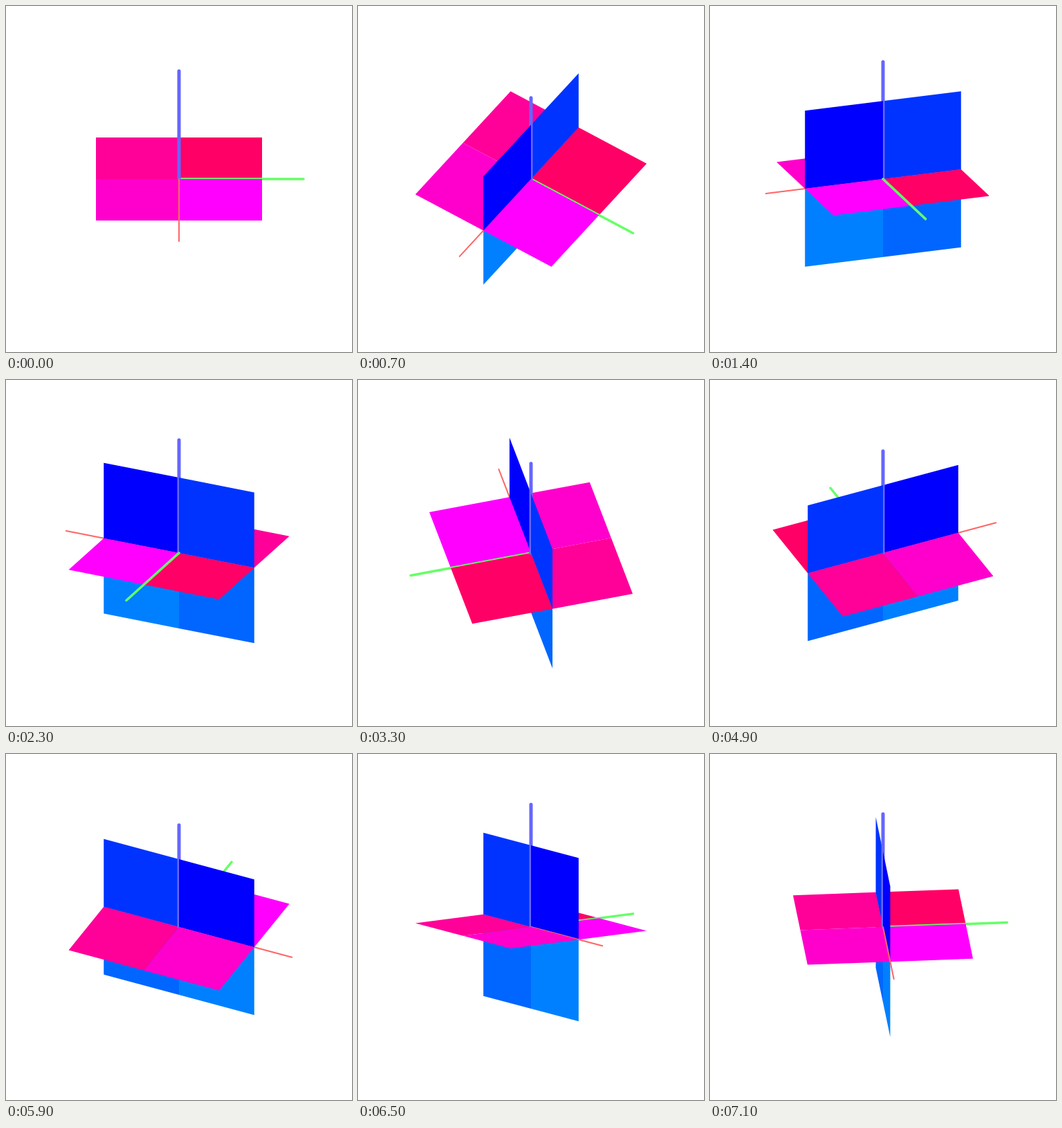
An HTML page with a canvas for the animation above (7.2 s loop, 500 px wide and 500 px high).

```html
<!DOCTYPE html>
<html lang="en">
<head>
<meta charset="utf-8">
<title>Rotating planes</title>
<style>
  html, body { margin: 0; width: 100%; height: 100%; overflow: hidden; background: #fff; }
  canvas { display: block; width: 500px; height: 500px; }
</style>
</head>
<body>
<canvas id="stage" width="500" height="500"></canvas>
<script>
const ctx = document.getElementById('stage').getContext('2d');
const SIZE = 120, AXIS = 180, STEP = 100, STEPS = 72;
const RAD = Math.PI / 180;

// Quadrant between two axis directions, with its corner at the centre
const quad = (u, v, color) => ({
  color,
  points: [
    [0, 0, 0],
    u.map(c => c * SIZE),
    u.map((c, i) => (c + v[i]) * SIZE),
    v.map(c => c * SIZE)
  ]
});
const axis = (u, color, width) => ({
  color, width,
  points: [[0, 0, 0], u.map(c => c * AXIS)]
});

const X = [1, 0, 0], Y = [0, 1, 0], Z = [0, 0, 1];
const neg = v => v.map(c => -c);

const shapes = [
  quad(X, neg(Z), '#0080ff'),
  quad(neg(X), neg(Z), '#0066ff'),
  quad(neg(X), neg(Y), '#ff0099'),
  quad(neg(X), Y, '#ff0066'),
  quad(X, neg(Y), '#ff00cc'),
  quad(X, Y, '#ff00ff'),
  quad(neg(X), Z, '#0033ff'),
  quad(X, Z, '#0000ff'),
  axis(X, '#ff6666', 2),
  axis(Y, '#66ff66', 3.5),
  axis(Z, '#6666ff', 5)
];

function camera(turn, tilt) {
  const ct = Math.cos(turn), st = Math.sin(turn);
  const ce = Math.cos(tilt), se = Math.sin(tilt);
  return ([x, y, z]) => {
    const side = y * ct - x * st, near = x * ct + y * st;
    return [250 + side, 250 + near * se - z * ce, near * ce + z * se];
  };
}

function draw(step) {
  const degrees = step * 360 / STEPS;
  const tilt = 30 + 20 * Math.sin(3 * degrees * RAD);
  const project = camera(degrees * RAD, tilt * RAD);

  ctx.fillStyle = '#fff';
  ctx.fillRect(0, 0, 500, 500);
  ctx.lineCap = 'round';

  // Paint from back to front by mean depth
  shapes.map(shape => {
    const points = shape.points.map(project);
    const depth = points.reduce((sum, p) => sum + p[2], 0) / points.length;
    return { ...shape, points, depth };
  }).sort((a, b) => a.depth - b.depth).forEach(({ points, color, width }) => {
    ctx.beginPath();
    points.forEach(([x, y]) => ctx.lineTo(x, y));
    if (width) {
      ctx.strokeStyle = color;
      ctx.lineWidth = width;
      ctx.stroke();
    } else {
      ctx.fillStyle = color;
      ctx.fill();
    }
  });
}

function tick() {
  draw(Math.floor(performance.now() / STEP) % STEPS);
  requestAnimationFrame(tick);
}
tick();
</script>
</body>
</html>
```
